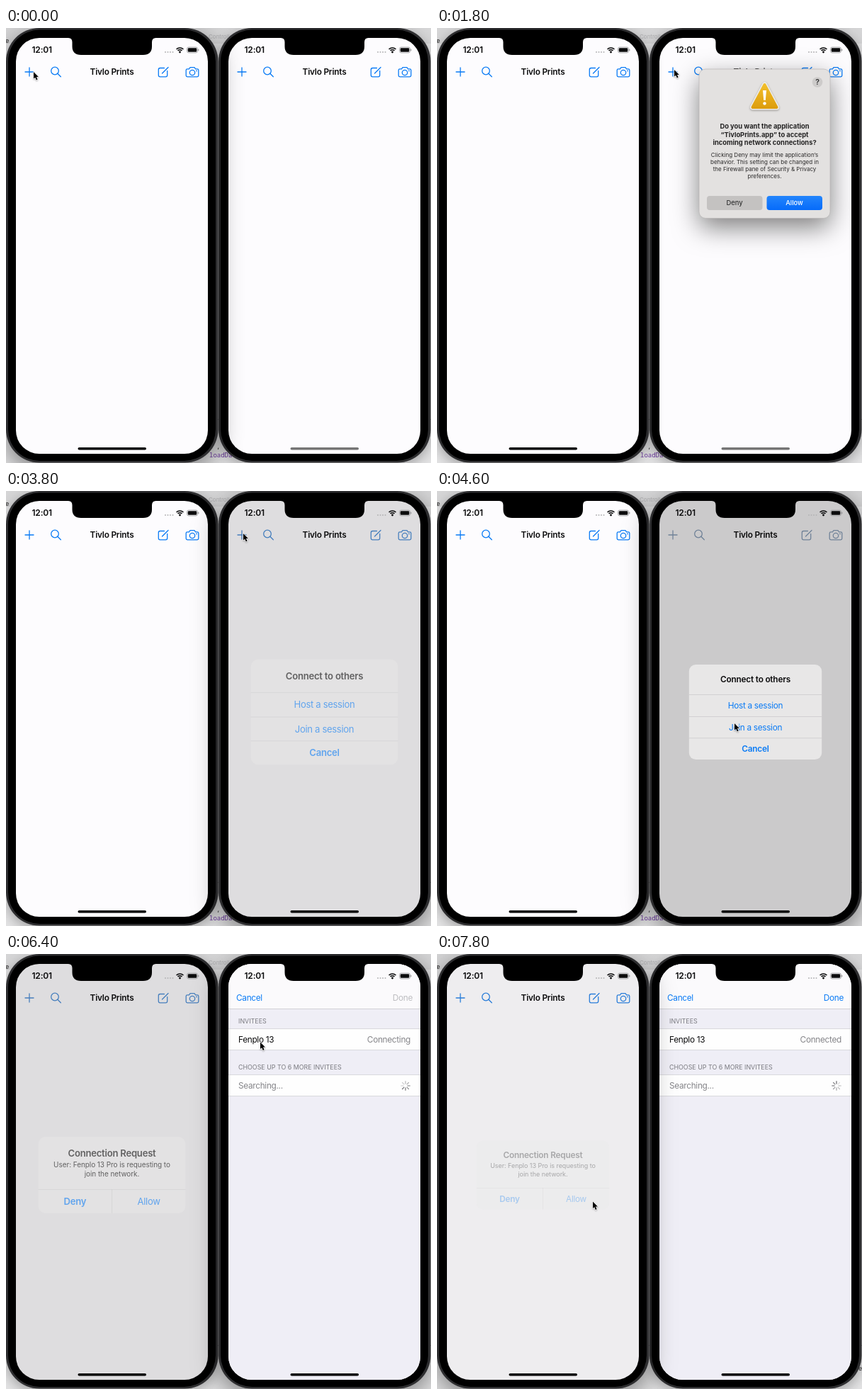
An HTML page with a canvas that plays this animation: 600 px wide and 614 px high, repeating every 8 s.

```html
<!DOCTYPE html>
<html lang="en">
<head>
<meta charset="utf-8">
<title>Two phones connecting</title>
<style>
html, body { margin: 0; width: 100%; height: 100%; overflow: hidden; background: #ddd; }
canvas { display: block; width: 600px; height: 614px; }
</style>
</head>
<body>
<canvas id="stage" width="600" height="614"></canvas>
<script>
const ctx = document.getElementById('stage').getContext('2d');
const LOOP = 8000, STEP = 200;
const BLUE = '#0a7bf5', SCREEN = '#fdfcfe', INK = '#0b0b0c', GREY = '#858589';
const APP = 'Tivlo Prints', DEVICE = 'Fenplo 13';

// Key lists: [time, value, ...]
const POINTER = [
  [0, 39, 62], [400, 39, 62], [600, 88, 190], [800, 130.5, 304.5], [1000, 130.5, 304.5],
  [1200, 205, 205], [1400, 300, 95], [1600, 335, 59], [1800, 335, 59], [2000, 415, 145],
  [2200, 503, 244], [2400, 503, 244], [2600, 485, 225], [2800, 415, 155], [3000, 356, 95],
  [3200, 335, 60], [3800, 335, 60], [4000, 372, 190], [4200, 418, 318], [4400, 420, 328],
  [5200, 420, 328], [5400, 402, 250], [5600, 370, 145], [5800, 359, 124.5], [6400, 359, 124.5],
  [6600, 310, 210], [6800, 245, 318], [7000, 220, 349.5], [7800, 220, 349.5]
];
const MENU_LEFT = [[0, 0], [200, 0.6], [400, 1], [800, 1], [1000, 0.42], [1200, 0]];
const MENU_RIGHT = [[3600, 0], [3800, 0.6], [4000, 1], [4800, 1], [5000, 0.42], [5200, 0]];
const REQUEST = [[6000, 0], [6200, 0.12], [6400, 0.6], [6600, 1], [7600, 1], [7800, 0.3]];
const SHEET = [[5000, 1], [5200, 0.5], [5400, 0.06], [5600, 0]];

function at(keys, t) {
  const next = keys.findIndex(k => k[0] > t);
  if (next === 0) return keys[0].slice(1);
  if (next < 0) return keys[keys.length - 1].slice(1);
  const a = keys[next - 1], b = keys[next], p = (t - a[0]) / (b[0] - a[0]);
  return a.slice(1).map((v, i) => v + (b[i + 1] - v) * p);
}

function box(x, y, w, h, r, fill) {
  ctx.beginPath();
  ctx.roundRect(x, y, w, h, r);
  if (fill) { ctx.fillStyle = fill; ctx.fill(); }
}

function rect(x, y, w, h, fill) {
  ctx.fillStyle = fill;
  ctx.fillRect(x, y, w, h);
}

function disc(x, y, r, fill) {
  ctx.beginPath();
  ctx.arc(x, y, r, 0, Math.PI * 2);
  ctx.fillStyle = fill;
  ctx.fill();
}

function shadow(alpha, blur, dy) {
  ctx.shadowColor = `rgba(0,0,0,${alpha})`;
  ctx.shadowBlur = blur;
  ctx.shadowOffsetY = dy;
}

function text(str, x, y, { size = 11.8, weight = 400, color = INK, align = 'left', gap } = {}) {
  ctx.font = `${weight} ${size}px Inter, sans-serif`;
  ctx.letterSpacing = (gap ?? (size < 11 ? 0 : weight > 400 ? -0.2 : -0.3)) + 'px';
  ctx.textAlign = align;
  ctx.textBaseline = 'alphabetic';
  ctx.fillStyle = color;
  ctx.fillText(str, x, y + size * 0.36);
}

function backdrop(t) {
  rect(0, 0, 600, 614, '#e4e4e5');
  rect(0, 0, 600, 22, '#d6d6d7');
  rect(0, 552, 600, 1, '#a5a5a6');
  text('Controller', 286, 12, { size: 8, color: '#b0b0b2' });
  if (t < 5000) {
    ctx.font = '9px "Noto Sans Mono", monospace';
    ctx.letterSpacing = '0px';
    ctx.fillStyle = '#333';
    ctx.fillText(',', 297, 594);
    ctx.fillStyle = '#6b36a0';
    ctx.fillText('loadData', 287, 606);
  }
}

function body(focused) {
  ctx.save();
  shadow(focused ? 0.45 : 0.3, focused ? 34 : 18, focused ? 10 : 5);
  box(0, 0, 299.5, 613.5, 47, '#2e2e30');
  ctx.restore();
  box(3, 2.5, 293, 608.5, 44.5, '#000');
}

function notch() {
  ctx.beginPath();
  ctx.moveTo(88, 13);
  ctx.lineTo(88, 14);
  ctx.quadraticCurveTo(93.5, 14, 93.5, 20);
  ctx.lineTo(93.5, 26);
  ctx.quadraticCurveTo(93.5, 38, 106, 38);
  ctx.lineTo(193.5, 38);
  ctx.quadraticCurveTo(206, 38, 206, 26);
  ctx.lineTo(206, 20);
  ctx.quadraticCurveTo(206, 14, 211.5, 14);
  ctx.lineTo(211.5, 13);
  ctx.fillStyle = '#000';
  ctx.fill();
}

function statusBar() {
  text('12:01', 36.5, 31, { weight: 600, size: 12 });
  for (let i = 0; i < 4; i++) disc(225 + i * 3.5, 34, 1, '#b4b4b6');
  ctx.strokeStyle = INK;
  ctx.lineWidth = 1.6;
  for (const r of [4.2, 7]) {
    ctx.beginPath();
    ctx.arc(245.5, 35, r, -Math.PI * 0.75, -Math.PI * 0.25);
    ctx.stroke();
  }
  disc(245.5, 34, 1.4, INK);
  box(255.5, 27, 15, 8, 2.4);
  ctx.strokeStyle = '#9a9a9c';
  ctx.lineWidth = 0.8;
  ctx.stroke();
  box(256.7, 28.2, 12.6, 5.6, 1.4, INK);
  rect(271.3, 29.7, 1, 2.6, '#8c8c8e');
}

function line(...pts) {
  ctx.beginPath();
  for (let i = 0; i < pts.length; i += 2) ctx.lineTo(pts[i], pts[i + 1]);
  ctx.stroke();
}

function navBar(dim) {
  const mix = (a, b) => Math.round(a + (b - a) * dim);
  const tint = `rgb(${mix(10, 112)},${mix(123, 130)},${mix(245, 152)})`;
  ctx.strokeStyle = tint;
  ctx.lineWidth = 1.3;
  ctx.lineCap = ctx.lineJoin = 'round';
  line(27, 62, 39, 62);
  line(33, 56, 33, 68);
  ctx.beginPath();
  ctx.arc(69, 60.5, 5.3, 0, Math.PI * 2);
  ctx.stroke();
  line(72.8, 64.3, 77.3, 68.8);
  // Compose
  ctx.beginPath();
  ctx.moveTo(223.5, 56.5);
  ctx.lineTo(217.5, 56.5);
  ctx.quadraticCurveTo(215.3, 56.5, 215.3, 58.7);
  ctx.lineTo(215.3, 66.6);
  ctx.quadraticCurveTo(215.3, 68.8, 217.5, 68.8);
  ctx.lineTo(225.5, 68.8);
  ctx.quadraticCurveTo(227.7, 68.8, 227.7, 66.6);
  ctx.lineTo(227.7, 60.5);
  ctx.stroke();
  line(220.5, 64, 229, 55.5);
  // Camera
  ctx.beginPath();
  ctx.moveTo(256, 57.8);
  ctx.lineTo(258.4, 57.8);
  ctx.lineTo(260, 55.6);
  ctx.lineTo(266, 55.6);
  ctx.lineTo(267.6, 57.8);
  ctx.lineTo(270, 57.8);
  ctx.quadraticCurveTo(271.8, 57.8, 271.8, 59.6);
  ctx.lineTo(271.8, 67);
  ctx.quadraticCurveTo(271.8, 68.8, 270, 68.8);
  ctx.lineTo(256, 68.8);
  ctx.quadraticCurveTo(254.2, 68.8, 254.2, 67);
  ctx.lineTo(254.2, 59.6);
  ctx.quadraticCurveTo(254.2, 57.8, 256, 57.8);
  ctx.stroke();
  ctx.beginPath();
  ctx.arc(263, 63, 3.7, 0, Math.PI * 2);
  ctx.stroke();
  disc(269, 60.4, 0.9, tint);
  text(APP, 149.5, 62, { weight: 600, align: 'center' });
}

function alertBox(k, scale, h, draw) {
  ctx.save();
  ctx.globalAlpha = k;
  ctx.translate(149.5, 312);
  ctx.scale(scale, scale);
  box(-93.7, -h / 2, 187.4, h, 9.5, '#e8e7e7');
  draw();
  ctx.restore();
}

const centred = { align: 'center' };
const HAIR = '#c9c8ca';

function menu() {
  text('Connect to others', 0, -46, { weight: 600, ...centred });
  for (const y of [-25, 6, 36.5]) rect(-93.7, y, 187.4, 0.7, HAIR);
  text('Host a session', 0, -9.5, { color: BLUE, ...centred });
  text('Join a session', 0, 21.5, { color: BLUE, ...centred });
  text('Cancel', 0, 52, { weight: 600, color: BLUE, ...centred });
}

function request() {
  text('Connection Request', 0, -28, { weight: 600, ...centred });
  text(`User: ${DEVICE} Pro is requesting to`, 0, -13, { size: 9, gap: -0.05, ...centred });
  text('join the network.', 0, -1.5, { size: 9, gap: -0.05, ...centred });
  rect(-93.7, 18, 187.4, 0.7, HAIR);
  rect(-0.2, 18, 0.7, 30.6, HAIR);
  text('Deny', -47, 34, { weight: 600, color: BLUE, ...centred });
  text('Allow', 47, 34, { color: BLUE, ...centred });
}

function spinner(x, y, t) {
  const head = Math.floor(t / 125) % 8;
  ctx.save();
  ctx.translate(x, y);
  ctx.lineWidth = 1.4;
  ctx.lineCap = 'round';
  for (let i = 0; i < 8; i++) {
    const a = i * Math.PI / 4, age = (head - i + 8) % 8;
    ctx.strokeStyle = `rgba(100,100,105,${0.85 - age * 0.09})`;
    line(Math.cos(a) * 3, Math.sin(a) * 3, Math.cos(a) * 6.2, Math.sin(a) * 6.2);
  }
  ctx.restore();
}

function row(y) {
  rect(14, y, 271, 31, '#d9d9dd');
  rect(14, y + 1, 271, 29, '#fefefe');
}

function sheet(t) {
  const picked = t >= 6200, done = t >= 7800;
  const head = { size: 8.9, color: '#7b7b80' };
  rect(14, 14, 271, 600, '#efeef6');
  rect(14, 14, 271, 63, '#fbfafc');
  rect(14, 77, 271, 1, '#d2d2d6');
  text('Cancel', 25, 62, { color: BLUE });
  text('Done', 274, 62, { color: done ? BLUE : '#bdbdc0', align: 'right' });
  text(picked ? 'INVITEES' : 'CHOOSE UP TO 7 INVITEES', 28, 95, head);
  row(105);
  if (t >= 5600) text(DEVICE, 28, 121);
  if (!picked) {
    if (t < 5600) text('Searching...', 28, 121, { color: GREY });
    spinner(264, 121, t);
    return;
  }
  text(done ? 'Connected' : 'Connecting', 271, 121, { color: GREY, align: 'right' });
  text('CHOOSE UP TO 6 MORE INVITEES', 28, 160, head);
  row(170);
  text('Searching...', 28, 186, { color: GREY });
  spinner(264, 186, t);
}

function phone(right, focused, t) {
  ctx.save();
  ctx.translate(right ? 300 : 0, 0);
  body(focused);
  ctx.save();
  box(14, 14, 271, 587, 33, SCREEN);
  ctx.clip();
  const [menuK] = at(right ? MENU_RIGHT : MENU_LEFT, t);
  const [askK] = right ? [0] : at(REQUEST, t);
  const k = Math.max(menuK, askK);
  rect(14, 14, 271, 587, `rgba(0,0,0,${0.2 * k})`);
  navBar(k);
  const opening = t < 600 || (t > 3600 && t < 4200) || (t > 6000 && t < 7000);
  const scale = opening ? 1 + 0.27 * (1 - k) : 1;
  if (menuK) alertBox(menuK, scale, 134, menu);
  if (askK) alertBox(askK, scale, 97.4, request);
  if (right && t >= 5000) {
    ctx.save();
    ctx.translate(0, 587 * at(SHEET, t)[0]);
    sheet(t);
    ctx.restore();
  }
  ctx.restore();
  notch();
  statusBar();
  box(101.5, 592, 96.5, 3.5, 1.8, right && t < 3200 ? '#757575' : '#000');
  ctx.restore();
}

function warning() {
  ctx.save();
  ctx.lineJoin = 'round';
  ctx.beginPath();
  ctx.moveTo(462.5, 80);
  ctx.lineTo(445.5, 112);
  ctx.lineTo(479.5, 112);
  ctx.closePath();
  shadow(0.35, 3, 1);
  ctx.lineWidth = 7;
  ctx.strokeStyle = '#f0eeea';
  ctx.stroke();
  shadow(0, 0, 0);
  const gold = ctx.createLinearGradient(0, 78, 0, 114);
  gold.addColorStop(0, '#f3c02c');
  gold.addColorStop(1, '#dc9c0c');
  ctx.fillStyle = ctx.strokeStyle = gold;
  ctx.lineWidth = 4;
  ctx.stroke();
  ctx.fill();
  ctx.beginPath();
  ctx.moveTo(460, 88);
  ctx.lineTo(465, 88);
  ctx.lineTo(463.8, 102);
  ctx.lineTo(461.2, 102);
  ctx.fillStyle = '#fff';
  ctx.fill();
  disc(462.5, 106.5, 2.2, '#fff');
  ctx.restore();
}

function dialog() {
  ctx.save();
  shadow(0.5, 36, 13);
  box(370, 58, 185, 210.5, 9, '#e3e1e0');
  ctx.restore();
  ctx.strokeStyle = '#b9b7b6';
  ctx.lineWidth = 0.7;
  ctx.stroke();
  warning();
  disc(537, 76.5, 7.3, '#cdcbca');
  text('?', 537, 76.5, { size: 10.5, weight: 600, color: '#333', ...centred });
  const title = ['Do you want the application', `“${APP.replace(' ', '')}.app” to accept`,
    'incoming network connections?'];
  title.forEach((s, i) => text(s, 462.5, 139 + i * 11.2,
    { size: 9.4, weight: 700, color: '#252424', gap: -0.03, ...centred }));
  const note = ['Clicking Deny may limit the application’s', 'behavior. This setting can be changed in',
    'the Firewall pane of Security & Privacy', 'preferences.'];
  note.forEach((s, i) => text(s, 462.5, 179 + i * 10.2, { size: 8, color: '#2b2a2a', ...centred }));
  box(381, 237, 78.5, 20, 4, '#c4c2c1');
  const blue = ctx.createLinearGradient(0, 237, 0, 257);
  blue.addColorStop(0, '#2385fc');
  blue.addColorStop(1, '#066bfa');
  box(465.5, 237, 78.5, 20, 4, blue);
  text('Deny', 420, 247, { size: 9.4, weight: 500, color: '#333', ...centred });
  text('Allow', 504.5, 247, { size: 9.4, weight: 500, color: '#fff', ...centred });
}

function pointer(x, y) {
  ctx.save();
  ctx.translate(x, y);
  ctx.beginPath();
  for (const [px, py] of [[0, 0], [0, 9.6], [2.2, 7.7], [3.8, 11.6], [5.6, 10.8], [4, 7], [6.9, 6.9]]) {
    ctx.lineTo(px, py);
  }
  ctx.closePath();
  shadow(0.3, 2, 1);
  ctx.lineJoin = 'round';
  ctx.lineWidth = 1.4;
  ctx.strokeStyle = '#fff';
  ctx.stroke();
  shadow(0, 0, 0);
  ctx.fillStyle = '#000';
  ctx.fill();
  ctx.restore();
}

function draw(now) {
  const t = Math.floor((now % LOOP) / STEP) * STEP;
  const asking = t >= 1600 && t < 2600;
  const rightFront = t >= 3200 && t < 7400;
  ctx.clearRect(0, 0, 600, 614);
  backdrop(t);
  phone(!rightFront, false, t);
  phone(rightFront, !asking, t);
  text('e', -1, 18, { size: 9, color: '#222' });
  if (t >= 7400) text('e', 595, 585, { size: 9, color: '#222' });
  if (asking) dialog();
  pointer(...at(POINTER, t));
}

const start = performance.now();
function tick() {
  draw(performance.now() - start);
  requestAnimationFrame(tick);
}
tick();
</script>
</body>
</html>
```
